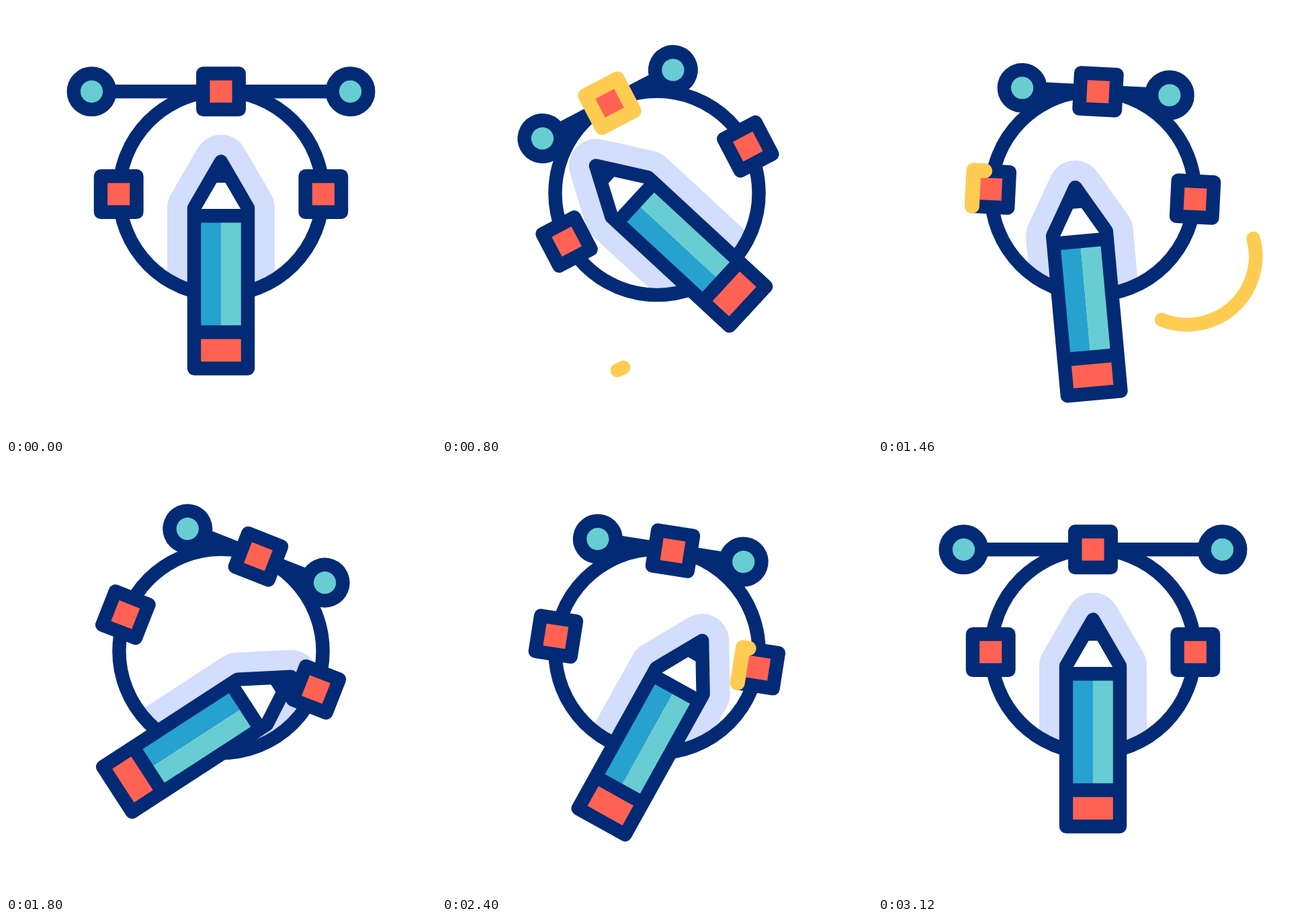
Write an HTML page that moves like this. It is 640 by 640 pixels and loops after 3.22 s.

```html
<!DOCTYPE html>
<html lang="en">
<head>
<meta charset="utf-8">
<title>Vector pencil</title>
<style>
  html, body { margin: 0; width: 100%; height: 100%; overflow: hidden; background: #fff; }
  svg { display: block; width: 100%; height: 100%; }
  .line { fill: none; stroke: #032b75; stroke-width: 20.4; stroke-linejoin: round; }
  .red { fill: #ff6253; }
  .teal { fill: #67cdd2; }
  .trace { fill: none; stroke: #ffcc52; stroke-width: 20.5; stroke-linecap: round; stroke-linejoin: round; }
  .node .trace { stroke-width: 22; }
</style>
</head>
<body>
<svg viewBox="0 0 640 640">
  <defs>
    <clipPath id="disc"><circle cx="320" cy="278.5" r="151"/></clipPath>
    <path id="outline" d="M280 539.5V300.5L320 231.5L360 300.5V539.5Z"/>
  </defs>

  <path id="arcLeft" class="trace" pathLength="1" d="M120.3 441A102 102 0 0 0 270 538"/>
  <path id="arcRight" class="trace" pathLength="1" d="M558.7 346A102 102 0 0 1 422 467"/>

  <g clip-path="url(#disc)">
    <use id="halo" href="#outline" fill="#d3ddfc" stroke="#d3ddfc" stroke-width="80" stroke-linejoin="round"/>
  </g>
  <circle class="line" cx="320" cy="278.5" r="151.6"/>

  <g id="frame">
    <path id="bar" class="line"/>
    <g id="knobs"></g>
    <g id="nodes"></g>
  </g>

  <g id="pencil">
    <use href="#outline" fill="#fff"/>
    <path d="M300 263L320 225L340 263Z" fill="#032b75"/>
    <path d="M285 312H320V486H285Z" fill="#27a2ce"/>
    <path class="teal" d="M320 312H355V486H320Z"/>
    <path class="red" d="M285 486H355V535H285Z"/>
    <path class="line" d="M280 312.2H360M280 485.5H360"/>
    <use href="#outline" class="line"/>
  </g>
</svg>
<script>
const LOOP = 3220, STROKE = 300, HALF = 26.75, MID = 320, BAR_Y = 127.3, RADIUS = 152.3;
const $ = id => document.getElementById(id);
const place = (el, value) => el.setAttribute('transform', value);

// Smooth 0 to 1 between two times
function ease(t, from, to) {
  const u = Math.min(1, Math.max(0, (t - from) / (to - from)));
  return u * u * (3 - 2 * u);
}

const square = `M${-HALF} ${HALF}H${HALF}V${-HALF}H${-HALF}Z`;
const node = (x, y) => `<g class="node" transform="translate(${x} ${y})">
  <path class="red" d="${square}"/><path class="line" d="${square}"/>
  <path class="trace" pathLength="1" d="${square}"/></g>`;
$('nodes').innerHTML = node(MID, BAR_Y) + node(MID - RADIUS, 280) + node(MID + RADIUS, 280);
$('knobs').innerHTML = '<g><circle class="teal" r="27"/><circle class="line" r="26.8"/></g>'.repeat(2);

const [leftKnob, rightKnob] = $('knobs').children;
const [topRing, leftRing, rightRing] = document.querySelectorAll('.node .trace');

// Each stroke is drawn, then wiped from its start
function trim(el, t, begin) {
  const end = ease(t, begin, begin + STROKE);
  const start = ease(t, begin + STROKE, begin + 2 * STROKE);
  const shown = end - start > 0.001;
  el.style.display = shown ? '' : 'none';
  if (!shown) return;
  el.setAttribute('stroke-dasharray', `${end - start} 3`);
  el.setAttribute('stroke-dashoffset', -start);
}

function drawFrame(t) {
  const turn = -28 * ease(t, 220, 840) + 51.7 * ease(t, 840, 1940) - 23.7 * ease(t, 1940, 2730);
  const spread = 1 - ease(t, 220, 600) + ease(t, 2420, 2800);
  const left = MID - 113 - 79.5 * spread;
  const right = MID + 106.5 + 86 * spread;
  place($('frame'), `rotate(${turn} ${MID} 279)`);
  $('bar').setAttribute('d', `M${left} ${BAR_Y}H${right}`);
  place(leftKnob, `translate(${left} ${BAR_Y})`);
  place(rightKnob, `translate(${right} ${BAR_Y})`);
}

function drawPencil(t) {
  const toLeft = ease(t, 310, 1060);
  const toRight = ease(t, 1095, 1840);
  const toTop = ease(t, 2163, 2840);
  const home = ease(t, 2840, 3120);

  const tilt = -65.2 * toLeft + 123.2 * toRight - 102 * toTop + 44 * home;
  const x = MID - 36 * toLeft + 67 * toRight ** 1.85 - 24 * toTop - 7 * home;
  const y = MID - 68.5 * ease(t, 220, 560) + 116.5 * ease(t, 620, 1040)
    - 3 * toRight - 8.5 * Math.sin(Math.PI * toRight)
    - 124 * ease(t, 2225, 2840) + 79 * home;

  const pose = `translate(${x} ${y}) rotate(${tilt}) translate(${-MID} ${-MID})`;
  place($('pencil'), pose);
  place($('halo'), pose);
}

function draw(t) {
  drawFrame(t);
  drawPencil(t);
  trim($('arcLeft'), t, 240);
  trim(topRing, t, 507);
  trim(leftRing, t, 976);
  trim($('arcRight'), t, 1160);
  trim(rightRing, t, 1908);
}

const origin = performance.now();
function tick() {
  draw((performance.now() - origin) % LOOP);
  requestAnimationFrame(tick);
}
tick();
</script>
</body>
</html>
```
